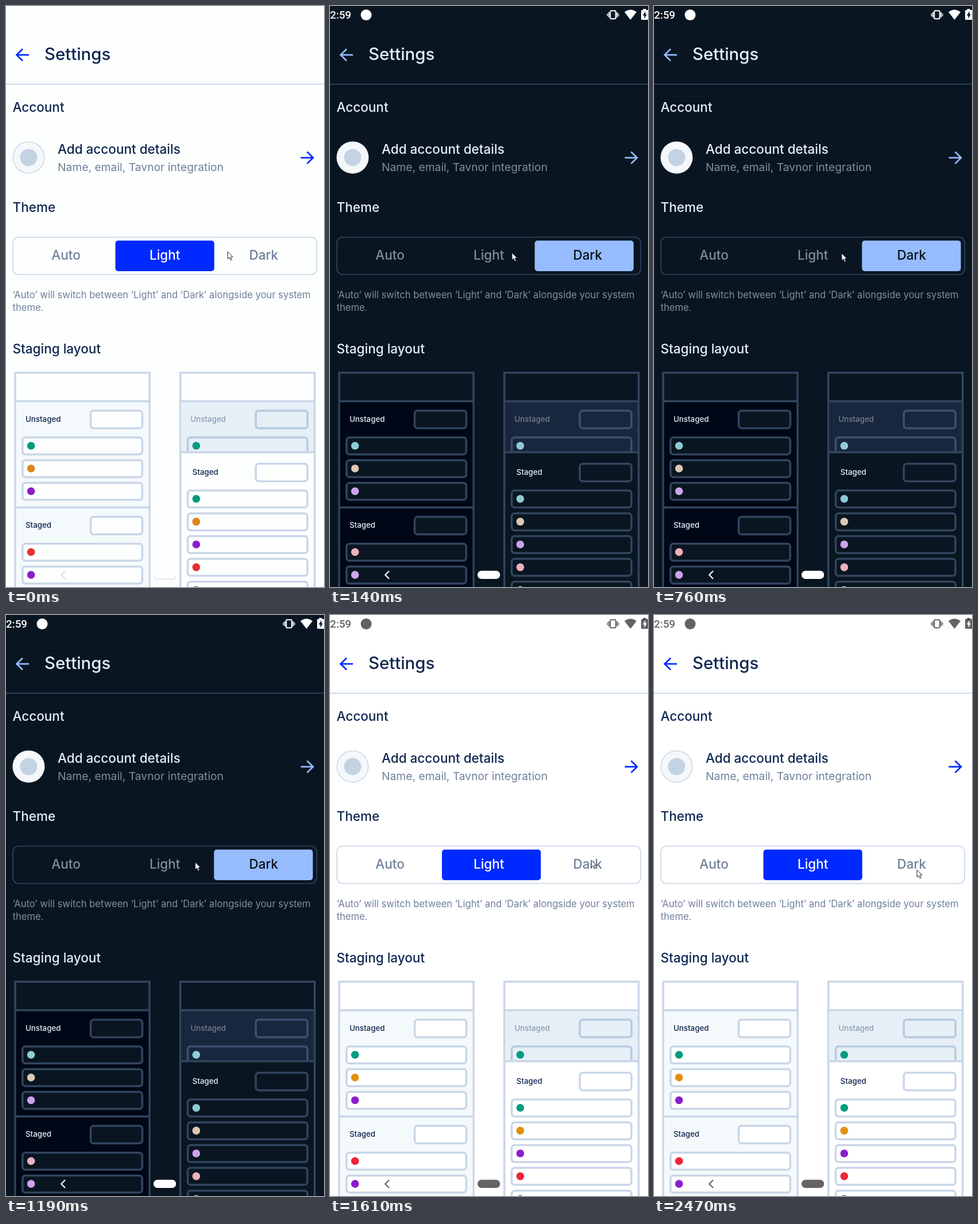
An HTML page with a canvas that plays this animation: 554x1010 px, repeating every 2520 ms.

```html
<!DOCTYPE html>
<html lang="en">
<head>
<meta charset="utf-8">
<title>Settings theme switch</title>
<style>
  html, body { margin: 0; width: 100%; height: 100%; overflow: hidden; background: #fff; }
  canvas { display: block; width: 554px; height: 1010px; }
</style>
</head>
<body>
<canvas id="stage" width="554" height="1010"></canvas>
<script>
const ctx = document.getElementById('stage').getContext('2d');
const LOOP = 2520, TO_DARK = 140, TO_LIGHT = 1610, BARS_FADE = 1430, BARS_DONE = 1520;

const light = {
  bg: '#ffffff', panel: '#f4f9fb', veil: '#e6eff5', text: '#0f2650', muted: '#6f8099',
  faint: '#8c9bb5', border: '#c9d6e8', veilBorder: '#b7c9e0', accent: '#0029ff', onAccent: '#ffffff',
  disc: '#f4f8fb', discEdge: '#c5d5e6',
  dots: ['#009b80', '#e0920f', '#8b1dcc', '#f02338', '#56685f']
};
const warmLight = { ...light, bg: '#fcfffe', dots: ['#039a7e', '#dd8518', '#8b1dcc', '#e83030', '#56685f'] };
const dark = {
  bg: '#091621', panel: '#000717', veil: '#19273e', text: '#e4effd', muted: '#828d9a',
  faint: '#737f90', border: '#32455f', veilBorder: '#3c5170', accent: '#96bbff', onAccent: '#07101a',
  disc: '#f4f8fb', discEdge: '#f4f8fb',
  dots: ['#8fcbd6', '#dcc8b4', '#cda3ec', '#eab0be', '#d2cbbd']
};

// time, x, y of the pointer tip
const pointerKeys = [
  [0, 387, 427], [50, 350, 427], [90, 322, 427], [140, 317, 429], [570, 317, 429],
  [760, 327, 430], [1090, 329, 430], [1370, 331, 430], [1470, 409, 430], [1520, 455, 426],
  [2230, 456, 426], [2470, 458, 443], [LOOP, 458, 443]
];

function pointerAt(t) {
  const i = pointerKeys.findIndex(k => k[0] > t);
  const a = pointerKeys[i - 1], b = pointerKeys[i];
  const p = (t - a[0]) / (b[0] - a[0]);
  return [a[1] + (b[1] - a[1]) * p, a[2] + (b[2] - a[2]) * p];
}

function text(str, x, y, size, color, weight = 500, align = 'left', family = 'Inter') {
  ctx.font = `${weight} ${size}px ${family}, sans-serif`;
  ctx.textAlign = align;
  ctx.fillStyle = color;
  ctx.fillText(str, x, y);
}

function rect(x, y, w, h, color) {
  ctx.fillStyle = color;
  ctx.fillRect(x, y, w, h);
}

function box(x, y, w, h, r, fill, stroke, width) {
  ctx.beginPath();
  ctx.roundRect(x, y, w, h, r);
  if (fill) { ctx.fillStyle = fill; ctx.fill(); }
  if (stroke) { ctx.strokeStyle = stroke; ctx.lineWidth = width; ctx.stroke(); }
}

function disc(x, y, r, color) {
  ctx.beginPath();
  ctx.arc(x, y, r, 0, Math.PI * 2);
  ctx.fillStyle = color;
  ctx.fill();
}

function path(points, closed) {
  ctx.beginPath();
  points.forEach(([x, y]) => ctx.lineTo(x, y));
  if (closed) ctx.closePath();
}

function line(points, color, width) {
  path(points);
  ctx.strokeStyle = color;
  ctx.lineWidth = width;
  ctx.stroke();
}

function arrow(tipX, y, dir, color) {
  const neck = tipX - dir * 10.5;
  line([[tipX - dir * 21.5, y], [tipX, y]], color, 2.7);
  line([[neck, y - 10.3], [tipX, y], [neck, y + 10.3]], color, 2.7);
}

function row(x, y, c, dot, border = c.border, fill = c.bg) {
  box(x, y - 14.5, 208.5, 29.5, 5, fill, border, 3.5);
  disc(x + 14.8, y, 6.8, c.dots[dot]);
}

function button(x, y, c, border = c.border, fill = c.bg) {
  box(x, y, 90, 30.5, 5, fill, border, 3.5);
}

function card(x, c) {
  box(x, 637.5, 234, 400, 0, c.bg, c.border, 3.5);
}

function stackedLayout(c) {
  card(16, c);
  rect(17.7, 688, 230.6, 330, c.panel);
  rect(16, 685.3, 234, 3.5, c.border);
  rect(16, 870, 234, 3.5, c.border);
  text('Unstaged', 34, 722.7, 13.3, c.text);
  button(147.5, 703.5, c);
  [764.5, 804, 843.5].forEach((y, i) => row(28.8, y, c, i));
  text('Staged', 34, 907.4, 13.3, c.text);
  button(147.5, 888, c);
  row(28.8, 949.2, c, 3);
  row(28.8, 988.9, c, 2);
}

function overlaidLayout(c) {
  card(303.7, c);
  rect(305.4, 688, 230.6, 87, c.veil);
  text('Unstaged', 321.5, 722.7, 13.3, c.faint);
  button(435.2, 703.5, c, c.veilBorder, c.veil);
  ctx.save();
  ctx.beginPath();
  ctx.rect(304, 688, 233, 87);
  ctx.clip();
  row(316.6, 764.5, c, 0, c.veilBorder, c.veil);
  ctx.restore();
  rect(303.7, 685.3, 234, 3.5, c.border);
  rect(303.7, 774, 234, 3.5, c.border);
  text('Staged', 324.8, 815.3, 13.3, c.text);
  button(435.2, 795.7, c);
  for (let i = 0; i < 5; i++) row(316.6, 856.8 + i * 39.6, c, i);
}

function themeSwitch(c, pillX) {
  box(12, 401.8, 529.3, 65, 10, null, c.border, 1.6);
  box(pillX, 407.7, 172.3, 53.3, 5, c.accent);
  const active = c === dark ? 2 : 1;
  ['Auto', 'Light', 'Dark'].forEach((name, i) =>
    text(name, 104.6 + i * 172.1, 441.4, 22.5, i === active ? c.onAccent : c.muted, 500, 'center'));
}

function statusBar(c, color) {
  text('2:59', 0, 22, 18.8, color, 500, 'left', 'Roboto');
  disc(63, 15.5, 9.5, color);
  box(488.3, 8.2, 9.4, 14, 1.5, null, color, 2);
  rect(485, 10.8, 1.8, 9, color);
  rect(499.2, 10.8, 1.8, 9, color);
  rect(482.6, 13, 1.6, 4.8, color);
  rect(501.8, 13, 1.6, 4.8, color);
  ctx.beginPath();
  ctx.moveTo(523.5, 24);
  ctx.lineTo(513, 10.5);
  ctx.quadraticCurveTo(523.5, 2.5, 534, 10.5);
  ctx.closePath();
  ctx.fillStyle = color;
  ctx.fill();
  rect(545.5, 5, 5, 3, color);
  box(542, 7, 14, 17, 1.5, color);
  path([[549.5, 9], [544.8, 16.5], [547.5, 16.5], [547.5, 22], [552, 14.5], [549.5, 14.5]], true);
  ctx.fillStyle = c.bg;
  ctx.fill();
}

function navBar(chevron, pill) {
  line([[103, 982.3], [96.3, 989], [103, 995.7]], chevron, 2.2);
  box(257, 981.8, 39.3, 14.2, 7, pill);
}

function pointer([x, y]) {
  const shape = [[0, 0], [0, 12.5], [2.8, 9.9], [5, 14.8], [7.2, 13.8], [5.1, 9.2], [9, 9]];
  path(shape.map(([dx, dy]) => [x + dx, y + dy]), true);
  ctx.fillStyle = '#fff';
  ctx.fill();
  ctx.strokeStyle = '#20242c';
  ctx.lineWidth = 1;
  ctx.stroke();
}

function systemBars(t, c) {
  if (t < TO_DARK) {
    navBar('#dedede', '#fff');
    ctx.beginPath();
    ctx.moveTo(257.5, 990.5);
    ctx.quadraticCurveTo(258.5, 996.3, 264, 996.3);
    ctx.lineTo(289.5, 996.3);
    ctx.quadraticCurveTo(295, 996.3, 296, 990.5);
    ctx.strokeStyle = '#d4d6d6';
    ctx.lineWidth = 1.2;
    ctx.stroke();
    return;
  }
  const p = Math.min(1, Math.max(0, (t - BARS_FADE) / (BARS_DONE - BARS_FADE)));
  const ink = 255 * (1 - p), grey = 255 - 154 * p;
  statusBar(c, `rgba(${ink},${ink},${ink},${1 - 0.39 * p})`);
  const nav = `rgb(${grey},${grey},${grey})`;
  navBar(nav, nav);
}

function draw(t) {
  const isDark = t >= TO_DARK && t < TO_LIGHT;
  const c = isDark ? dark : t < TO_DARK ? warmLight : light;
  const settle = start => Math.exp((start - t) / 45);
  const pillX = isDark ? 362.3 - 5.8 * settle(TO_DARK)
    : 190.5 + (t >= TO_LIGHT ? 4.6 * settle(TO_LIGHT) : 0);

  rect(0, 0, 554, 1010, c.bg);
  arrow(18.5, 85, -1, c.accent);
  text('Settings', 67, 94.3, 29.4, c.text);
  rect(0, 135, 554, 1.7, c.border);

  text('Account', 11.5, 183.8, 22.5, c.text);
  disc(39.4, 263.4, 28, c.discEdge);
  disc(39.4, 263.4, 26.6, c.disc);
  disc(39.4, 263.4, 15, '#c3d3e3');
  text('Add account details', 90, 257, 22.5, c.text);
  text('Name, email, Tavnor integration', 90, 286.8, 19.3, c.muted, 400);
  arrow(535, 263.8, 1, c.accent);

  text('Theme', 11.5, 357.8, 22.5, c.text);
  themeSwitch(c, pillX);
  text('‘Auto’ will switch between ‘Light’ and ‘Dark’ alongside your system', 11.5, 507.6, 16.6, c.muted, 400);
  text('theme.', 11.5, 529.8, 16.6, c.muted, 400);

  text('Staging layout', 11.5, 603.8, 22.5, c.text);
  stackedLayout(c);
  overlaidLayout(c);
  systemBars(t, c);
  pointer(pointerAt(t));
}

const start = performance.now();
function tick() {
  draw((performance.now() - start) % LOOP);
  requestAnimationFrame(tick);
}
tick();
</script>
</body>
</html>
```
